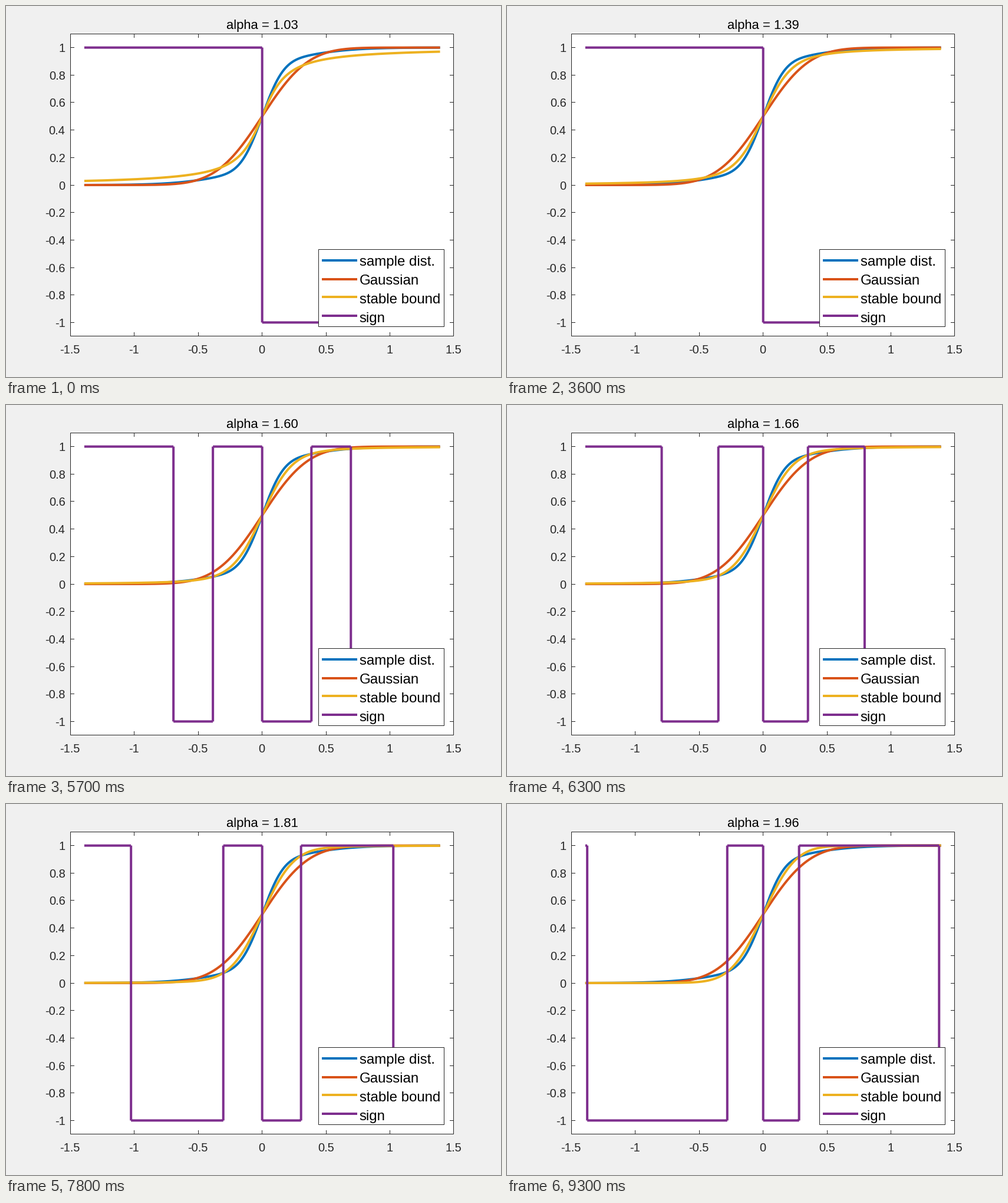
Recreate the animation shown at these times as a matplotlib script. Size 840 by 630 pixels, loop 9.6 s.

```python
import math

import matplotlib.pyplot as plt
import numpy as np
from matplotlib.animation import FuncAnimation
from matplotlib.patches import Rectangle

W, H, DPI = 840, 630, 100
PT = 72 / DPI  # points per pixel
FRAMES, STEP_MS = 32, 300
INK = (0.15, 0.15, 0.15)
BLUE, RED, GOLD, PURPLE = "#0072BD", "#D95319", "#EDB120", "#7E2F8E"

plt.rcParams["font.family"] = "Liberation Sans"
fig = plt.figure(figsize=(W / DPI, H / DPI), dpi=DPI, facecolor="#F0F0F0")
ax = fig.add_axes([0, 0, 1, 1])
ax.set(xlim=(0, W), ylim=(H, 0))
ax.axis("off")


def X(x):
    return 109.2 + 217 * (np.asarray(x) + 1.5)


def Y(y):
    return 304 - 233.4 * np.asarray(y)


def line(xs, ys, color, width=4, z=3):
    return ax.plot(xs, ys, color=color, lw=width * PT, zorder=z, snap=False,
                   solid_capstyle="butt", solid_joinstyle="round")[0]


def box(x0, y0, x1, y1, z, face="white", edge=INK):
    ax.add_patch(Rectangle((x0, y0), x1 - x0, y1 - y0, fc=face, ec=edge,
                           lw=PT, zorder=z, snap=False))


def text(x, y, s, size, color="black", ha="center", z=9):
    return ax.text(x, y, s, fontsize=size * PT, color=color, ha=ha,
                   va="baseline", zorder=z)


# Distributions, kept as upper tails on x > 0 and mirrored
SCALE, SIGMA, LIMIT = math.sqrt(0.02), math.sqrt(0.08), 1.391
N = 600
half = (np.arange(N) + 0.5) * LIMIT / (N - 0.5)
grid = np.concatenate([-half[::-1], half])


def normal_tail(x, sigma):
    return np.array([0.5 * math.erfc(v / sigma / math.sqrt(2)) for v in x])


def cdf(tail):
    return np.concatenate([tail[::-1], 1 - tail])


# Inversion integral of the stable law, with t = u^3
du = 2.9 / 1500
u = (np.arange(1500) + 0.5) * du
kernel = 3 * np.sin(np.outer(half / SCALE, u ** 3)) / u * du / math.pi


def stable_tail(alpha):
    return 0.5 - kernel @ np.exp(-u ** (3 * alpha))


sample = 0.724 * normal_tail(half, 0.127) + 0.276 * normal_tail(half, 0.44)
gauss = normal_tail(half, SIGMA)


def sign_path(values):
    """Square wave as separate flat and upright strokes."""
    signs = np.sign(values)
    cut = np.flatnonzero(np.diff(signs))
    turns = (grid[cut] + grid[cut + 1]) / 2
    edges = np.concatenate([[-LIMIT], turns, [LIMIT]])
    levels = np.append(signs[cut], signs[-1])
    xs, ys = [], []
    for a, b, v in zip(edges[:-1], edges[1:], levels):
        xs += [a, b, np.nan]
        ys += [v, v, np.nan]
    for t in turns:
        xs += [t, t, np.nan]
        ys += [1, -1, np.nan]
    return X(xs), Y(ys)


# Axes
L, R, T, B = 109.5, 759.5, 47.5, 560.5
ax.add_patch(Rectangle((L, T), R - L, B - T, fc="white", ec="none", zorder=1))
box(L, T, R, B, 2, face="none")
for v in np.arange(-3, 4) / 2:
    x = math.floor(X(v)) + 0.5
    if abs(v) < 1.5:
        line([x, x], [B, B - 6.5], INK, 1, 2)
        line([x, x], [T, T + 6.5], INK, 1, 2)
    text(X(v) - 0.5, 590, f"{v:g}", 20, INK)
for k in range(-5, 6):
    y = math.floor(Y(k / 5)) + 0.5
    line([L, L + 6.5], [y, y], INK, 1, 2)
    line([R, R - 6.5], [y, y], INK, 1, 2)
    text(100.5, y + 7.5, f"{k / 5:g}", 20, INK, "right")

# Curves
line(X(grid), Y(cdf(sample)), BLUE, z=3)
line(X(grid), Y(cdf(gauss)), RED, z=4)
bound = line([], [], GOLD, z=5)
sign = line([], [], PURPLE, z=6)
title = text(434.7, 39, "", 22)

# Legend
box(530.5, 413.5, 743.5, 544.5, 7)
entries = [("sample dist.", BLUE, 432), ("Gaussian", RED, 464),
           ("stable bound", GOLD, 494), ("sign", PURPLE, 526)]
for i, (name, color, y) in enumerate(entries):
    line([536, 596], [y, y], color, z=8)
    text(599.5, 441 + 32 * i, name, 24, ha="left")


def update(i):
    alpha = 1.03 + 0.03 * i
    tail = stable_tail(alpha)
    gap = tail - sample
    bound.set_data(X(grid), Y(cdf(tail)))
    sign.set_data(*sign_path(np.concatenate([gap[::-1], -gap])))
    title.set_text(f"alpha = {alpha:.2f}")
    return bound, sign, title


anim = FuncAnimation(fig, update, frames=FRAMES, interval=STEP_MS,
                     repeat=True, repeat_delay=0, blit=False)
plt.show()
```
